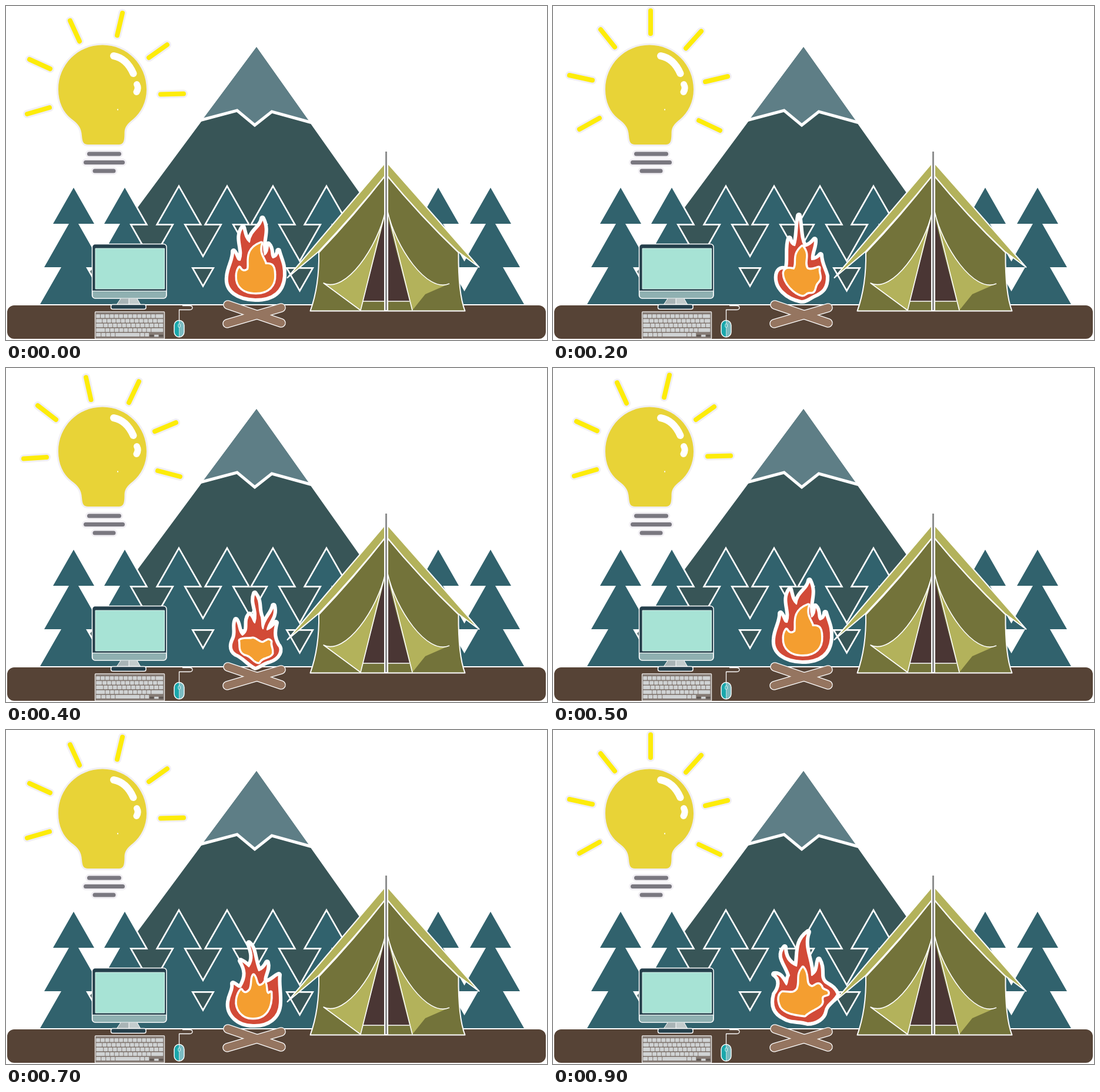
These frames come from a looping animation (920x569 px, 1 s). An HTML page with a canvas:

```html
<!DOCTYPE html>
<html lang="en">
<head>
<meta charset="utf-8">
<title>Camp office</title>
<style>
html, body { margin: 0; width: 100%; height: 100%; overflow: hidden; background: #fff; }
canvas { display: block; }
</style>
</head>
<body>
<canvas id="stage" width="920" height="569"></canvas>
<script>
const ctx = document.getElementById('stage').getContext('2d');
const STEP = 100;
const HALO = '#f1eff3', TREE = '#31626d', OLIVE = '#73733a', STRAW = '#b3b25b', SLATE = '#243f4b';

const rays = {
  tilt: [[198, 12, 189, 50], [109, 25, 125, 60], [40, 91, 75, 107], [36, 184, 74, 173],
    [243, 88, 274, 66], [263, 150.5, 302, 149.5]],
  up: [[166, 8, 166, 47], [81, 40, 105, 70], [28, 118, 67, 126.5], [45, 210, 79, 191],
    [226, 72, 252, 43], [259, 129, 297, 120], [248, 195, 284, 212]],
  lean: [[136, 16, 144.5, 54], [54, 64, 85, 88], [30, 154.5, 69, 152], [209, 59, 226, 23],
    [253, 108, 289, 93], [258, 175, 296, 185]]
};

const flame = (outer, inner) => ({ outer: new Path2D(outer), inner: new Path2D(inner) });
const flames = {
  tall: flame('M424 499C395 498 374 485 377 461C378 445 388 432 387 418C393 424 392 434 398 433C406 415 389 396 403 377C406 388 407 397 414 402C416 382 434 378 436 362C448 386 433 398 440 424C445 420 446 413 446 406C454 414 449 424 454 429C460 428 463 422 463 417C467 432 473 440 472 460C470 485 455 499 424 499Z',
    'M425 488C405 488 392 478 393 460C393 452 395 449 397 446C402 455 409 452 412 449C416 440 404 415 434 404C428 422 439 430 441 440C450 440 456 440 456 458C457 476 446 488 425 488Z'),
  spike: flame('M422 502C398 497 378 480 381 458C383 448 390 446 397 449C402 435 396 410 402 396C404 404 406 407 411 408C416 395 414 380 418 357C422 380 420 395 428 410C436 408 440 404 445 398C446 412 438 420 440 432C446 432 452 428 455 424C455 438 462 448 465 460C466 482 455 487 448 491C436 496 430 503 422 502Z',
    'M424 492C412 490 393 472 393 455C394 446 402 447 410 449C418 438 406 425 424 410C437 425 424 436 432 448C440 452 447 447 452 446C450 456 458 462 450 470C443 476 447 488 438 487C430 486 430 492 424 492Z'),
  curl: flame('M420 502C395 502 376 485 379 463C381 448 388 444 386 432C392 434 394 440 399 438C410 420 408 408 399 393C406 396 409 400 413 403C422 390 418 378 413 363C424 372 422 392 430 410C436 408 440 404 444 396C448 410 436 420 440 430C452 428 456 420 464 417C462 432 466 448 465 465C464 490 445 503 420 502Z',
    'M421 490C402 491 391 475 393 460C394 452 397 446 400 443C405 452 412 448 416 442C420 432 417 424 421 418C426 424 424 432 430 436C434 436 438 434 440 430C444 440 440 446 446 450C449 448 450 448 450 447C452 475 440 490 421 490Z'),
  low: flame('M424 510C412 504 405 493 391 487C380 480 384 468 387 462C393 450 386 440 391 429C397 436 394 448 402 455C416 446 404 432 414 420C420 425 420 432 423 434C430 412 416 402 423 384C434 398 428 410 434 424C436 432 434 440 437 444C440 425 452 420 455 405C460 425 446 432 444 446C450 444 454 440 459 434C454 452 456 462 462 472C470 480 464 494 448 499C436 502 432 508 424 510Z',
    'M430 501C420 500 420 490 406 487C396 482 400 472 398 464C405 460 412 463 420 461C426 462 432 470 438 468C446 464 446 462 450 466C448 474 453 476 452 486C448 494 436 490 430 501Z'),
  wide: flame('M433 499C418 494 405 498 393 490C376 482 372 468 377 450C385 440 389 424 376 416C388 414 392 428 397 434C400 428 398 424 402 418C396 398 380 386 394 370C394 390 404 398 414 402C418 380 412 360 434 344C424 370 440 390 440 418C452 410 448 402 452 391C462 408 452 420 462 430C470 436 478 438 483 450C478 462 464 466 462 480C460 490 448 499 433 499Z',
    'M428 486C412 484 395 482 388 471C382 458 385 450 390 447C400 446 408 452 416 442C422 428 414 418 425 405C436 418 426 434 440 438C446 438 450 428 456 437C457 446 470 442 467 450C460 452 456 452 457 460C460 472 440 474 428 486Z')
};

const poses = [
  ['tilt', 'tall'], ['lean', 'low'], ['up', 'spike'], ['tilt', 'curl'], ['lean', 'low'],
  ['tilt', 'tall'], ['up', 'spike'], ['tilt', 'curl'], ['tilt', 'tall'], ['up', 'wide']
];

const asPath = d => typeof d === 'string' ? new Path2D(d) : d;

function fill(d, color) {
  ctx.fillStyle = color;
  ctx.fill(asPath(d));
}

function stroke(d, color, width, join = 'round') {
  ctx.strokeStyle = color;
  ctx.lineWidth = width;
  ctx.lineJoin = join;
  ctx.stroke(asPath(d));
}

function box(x, y, w, h, r, color, edge, width = 1.5) {
  const p = new Path2D();
  p.roundRect(x, y, w, h, r);
  fill(p, color);
  if (edge) stroke(p, edge, width);
}

// Round-capped bars with a rim around them
function bars(list, color, width, rim, rimWidth) {
  const p = new Path2D();
  for (const [x1, y1, x2, y2] of list) {
    p.moveTo(x1, y1);
    p.lineTo(x2, y2);
  }
  ctx.lineCap = 'round';
  stroke(p, rim, width + rimWidth * 2);
  stroke(p, color, width);
  ctx.lineCap = 'butt';
}

function mountain() {
  fill('M426 70L102 508H735Z', '#385557');
  fill('M426 70L334.5 193L393 178L423 203L452 180L516 197Z', '#5e7e86');
  stroke('M331 194.5L393 178L423 203L452 180L519 198.5', '#fff', 5, 'miter');
}

function trees() {
  const p = new Path2D();
  const side = [[35, 371], [8, 371], [50, 445], [21, 445], [57, 508]];
  for (const x of [115, 202, 294, 376, 454, 545, 735, 824]) {
    p.moveTo(x, 309.5);
    for (const [dx, y] of side) p.lineTo(x + dx, y);
    for (const [dx, y] of [...side].reverse()) p.lineTo(x - dx, y);
    p.closePath();
  }
  stroke(p, '#fff', 5.4, 'miter');
  fill(p, TREE);
}

function bulb() {
  const body = 'M164 66.5C206 66.5 239 100 239 142C239 163 230 181 216 193C206 201 202 206 201.5 215C201.5 231 200 236 191 236H140C131 236 130 231 129 221C128 207 123 201 111 192C97 181 89 163 89 142C89 100 122 66.5 164 66.5Z';
  stroke(body, HALO, 6);
  fill(body, '#e8d337');
  ctx.lineCap = 'round';
  stroke('M183 85Q205 89 216.5 115', '#fff', 12);
  stroke('M222.5 133.5Q226 140 222 146.5', '#fff', 11);
  ctx.lineCap = 'butt';
  fill('M189 175.5h2v2h-2z', '#fff');
  bars([[141.5, 252, 192.5, 252], [135.5, 266.5, 198.5, 266.5], [151, 281, 183, 281]], '#7a7880', 7, HALO, 3);
}

function ground() {
  ctx.fillStyle = '#fff';
  ctx.fillRect(0, 508, 920, 61);
  box(2, 510, 916, 57, 12, '#564336');
}

function monitor() {
  box(146.5, 405.5, 126.5, 92.5, 5, SLATE, '#fff');
  box(147, 485.5, 125.5, 12.5, [0, 0, 5, 5], '#8fb0b1', '#fff', 1);
  box(152, 413, 117.5, 69, 0, '#a7e3d5', '#d9f3ec', 1);
  fill('M195 498.5H209V509H188Z', '#a9b4b6');
  fill('M209 498.5H223L229 509H209Z', '#c3cccd');
  stroke('M195 498.5L188 509M209 498.5V509M223 498.5L229 509', '#fff', 1);
  box(178.5, 508.5, 59.5, 8, 3, SLATE, '#fff');
}

function keyboard() {
  box(151.5, 521, 118, 46, 1, '#857b75', '#e6e3e1', 1.4);
  const row = (y, widths) => {
    let x = 153.2;
    for (const w of widths) {
      box(x, y, w - 1, 6.2, 0.8, '#d0d3d4');
      x += w;
    }
  };
  const same = (n, w) => Array(n).fill(w);
  row(525.3, [...same(13, 7.8), 13.6]);
  row(533.2, [11, ...same(12, 7.8), 10.4]);
  row(541.1, [13, ...same(11, 7.8), 8, 8.2]);
  row(549, [16, ...same(10, 7.8), 21]);
  row(556.9, [9, 8, 8, 8, 42, 8, 8]);
  for (const x of [244.2, 252.2, 260.2]) box(x, 560, 7.2, 3.4, 0.5, x > 250 && x < 260 ? '#d0d3d4' : '#5f5752');
}

function mouse() {
  stroke('M294.5 537V517.5H312Q317 517.5 317 514Q317 510.5 312 510.5H300', '#fff', 1.3);
  box(286, 535.5, 17, 28.5, 8.5, '#1aa7ab');
  box(294.5, 535.5, 8.5, 28.5, [0, 8.5, 8.5, 0], '#7bbcc2');
  stroke('M294.5 535V564', '#d5eced', 0.8);
  box(286, 535.5, 17, 28.5, 8.5, 'transparent', '#fff', 1.4);
  box(293, 541.5, 3, 6, 1.5, '#1aa7ab', '#fff', 1);
}

function tent() {
  const body = 'M646.5 287Q590 360 532 420Q533 476 517.5 519.5H780.5Q769 490 769.5 420Q705 358 646.5 287Z';
  fill(body, OLIVE);
  stroke(body, '#fff', 2);
  fill('M646.5 352L607 503H686Z', '#4a3634');
  stroke('M607 503H686', '#fff', 1.5);
  const left = 'M645 350C632 410 578 490 540 472L603 518.5Z';
  fill(left, STRAW);
  stroke(left, '#fff', 1.6);
  fill('M649 350C662 410 716 490 754 473L713 491L691 518.5Z', STRAW);
  stroke('M691 518.5L649 350C662 410 716 490 754 473', '#fff', 1.6);
  const roof = 'M646.5 265Q575 349 478.5 463L532 418Q592 355 646.5 287Q704 357 768 418L804.5 445Q734 364 646.5 265Z';
  fill(roof, STRAW);
  stroke(roof, '#fff', 2);
  ctx.fillStyle = '#fff';
  ctx.fillRect(643, 266, 7, 253);
  ctx.fillStyle = '#8d8e8e';
  ctx.fillRect(645, 248, 3, 270);
}

function fire({ outer, inner }) {
  stroke(outer, '#fff', 10);
  fill(outer, '#d24a37');
  stroke(outer, '#fff', 2.2);
  stroke(inner, '#fff', 7);
  fill(inner, '#f49e30');
}

function draw(now) {
  const [ray, blaze] = poses[Math.floor(now / STEP) % poses.length];
  ctx.fillStyle = '#fff';
  ctx.fillRect(0, 0, 920, 569);
  mountain();
  trees();
  ground();
  bars(rays[ray], '#fdec0a', 8, HALO, 3);
  bulb();
  monitor();
  keyboard();
  mouse();
  tent();
  bars([[377, 509, 468, 540], [468, 514, 376, 541]], '#957560', 13, '#fff', 1.3);
  fire(flames[blaze]);
}

const start = performance.now();
function tick() {
  draw(performance.now() - start);
  requestAnimationFrame(tick);
}
tick();
</script>
</body>
</html>
```
